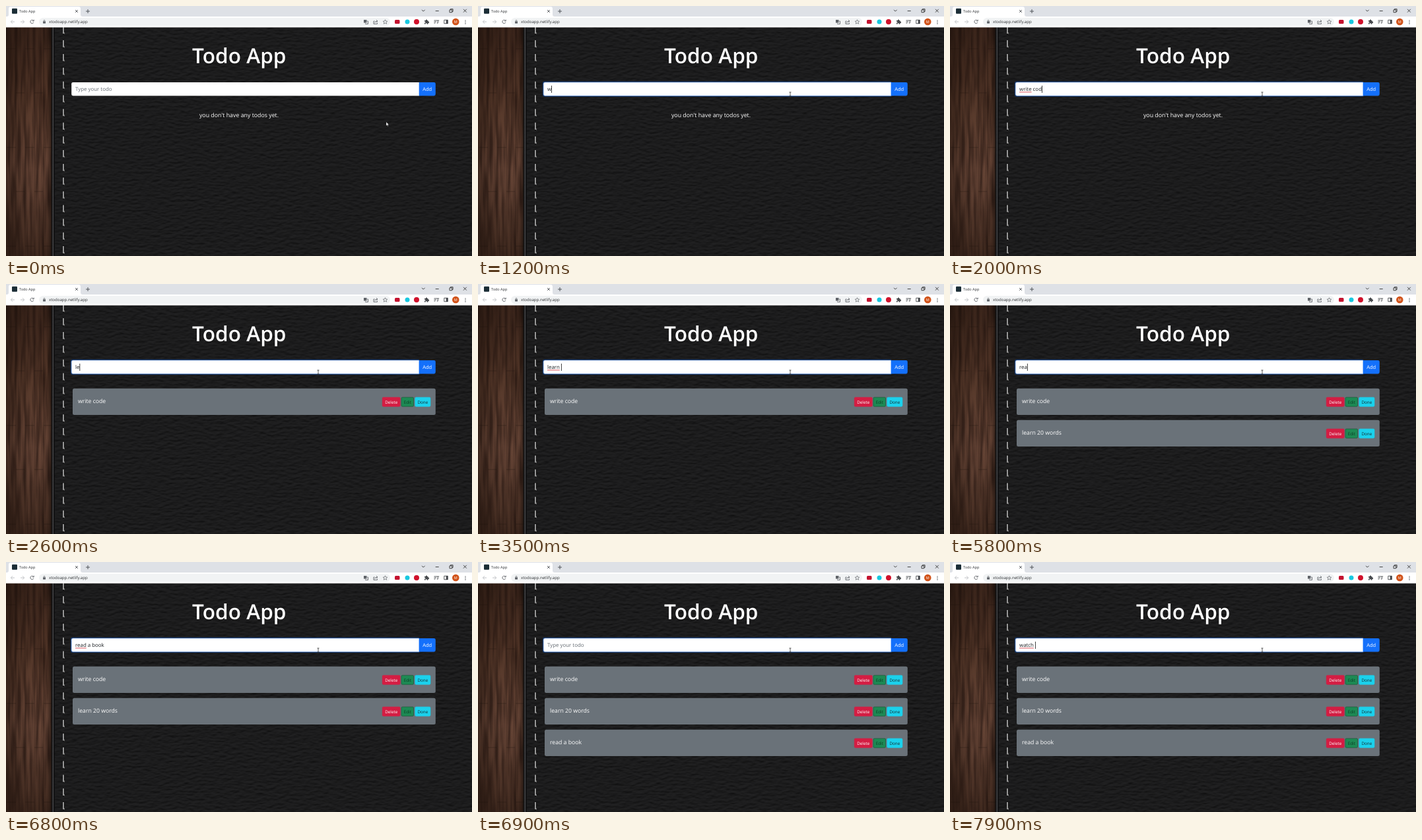
Write an HTML page that moves like this. It is 706 by 380 pixels and loops after 8 s.

```html
<!DOCTYPE html>
<html lang="en">
<head>
<meta charset="utf-8">
<title>Todo App</title>
<style>
  html, body { margin: 0; width: 100%; height: 100%; overflow: hidden; background: #1a1a1b; }
  svg { position: absolute; left: 0; top: 0; }
  #backdrop { will-change: transform; }
  text { font-family: 'Open Sans', 'Noto Sans', sans-serif; white-space: pre; text-rendering: geometricPrecision; }
  .mid { text-anchor: middle; }
  .icon { fill: none; stroke: #5f6368; stroke-width: .9; }
</style>
</head>
<body>
<svg id="backdrop" width="706" height="380">
  <defs>
    <filter id="leather" x="0" y="0" width="1" height="1" color-interpolation-filters="sRGB">
      <feTurbulence type="fractalNoise" baseFrequency=".1 .26" numOctaves="2" seed="8"/>
      <feDiffuseLighting surfaceScale="1.1" diffuseConstant="1" lighting-color="#222223">
        <feDistantLight azimuth="260" elevation="55"/>
      </feDiffuseLighting>
    </filter>
    <filter id="grain" x="0" y="0" width="1" height="1" color-interpolation-filters="sRGB">
      <feTurbulence type="fractalNoise" baseFrequency=".22 .016" numOctaves="2" seed="4"/>
      <feColorMatrix values="0 0 0 0 .08  0 0 0 0 .04  0 0 0 0 .03  1.1 0 0 0 -.35"/>
    </filter>
    <linearGradient id="wood" x2="0" y2="1">
      <stop offset="0" stop-color="#3b251b"/>
      <stop offset=".3" stop-color="#533628"/>
      <stop offset=".62" stop-color="#684637"/>
      <stop offset="1" stop-color="#422b20"/>
    </linearGradient>
    <linearGradient id="shade">
      <stop offset="0" stop-color="#150b06" stop-opacity=".4"/>
      <stop offset=".5" stop-color="#150b06" stop-opacity="0"/>
      <stop offset=".88" stop-color="#150b06" stop-opacity=".05"/>
      <stop offset="1" stop-color="#0c0806" stop-opacity=".6"/>
    </linearGradient>
    <pattern id="planks" width="28" height="150" patternUnits="userSpaceOnUse">
      <path d="M1 0V150M15 0V150M1 65H15M15 132H29" stroke="#1d100a" stroke-opacity=".45" stroke-width=".8"/>
    </pattern>
  </defs>
  <rect x="70" y="32" width="636" height="348" filter="url(#leather)"/>
  <g id="board">
    <rect y="32" width="70" height="348" fill="url(#wood)"/>
    <rect y="32" width="70" height="348" filter="url(#grain)"/>
    <rect y="32" width="70" height="348" fill="url(#planks)"/>
    <rect y="32" width="70" height="348" fill="url(#shade)"/>
  </g>
  <path d="M69.5 32V380M73 32V380" stroke="#111112" stroke-width="1.6"/>
  <path d="M71.3 32V380" stroke="#454547" stroke-width="1.5"/>
  <path d="M87.600 31.200V380" stroke="#0c0c0c" stroke-width="2.800" stroke-dasharray="12.200 8.670"/>
  <path d="M88.300 40V380" stroke="#777" stroke-width="1" stroke-dasharray="2.800 18.070"/>
  <path d="M87 31.200V380" stroke="#b0b0b0" stroke-width="1.700" stroke-dasharray="10.800 10.070"/>

  <!-- browser window -->
  <rect width="706" height="32.500" fill="#fff"/>
  <rect width="706" height="16" fill="#dee1e6"/>
  <path d="M1 16q3 0 3-3V4q0-3 3-3H110q3 0 3 3v9q0 3 3 3z" fill="#fff"/>
  <rect x="9" y="3.700" width="8" height="8" rx="1" fill="#1b2d36"/>
  <text x="20" y="10" font-size="5.500" fill="#303336">Todo App</text>
  <path class="icon" d="M105 6l3.800 3.800M108.800 6L105 9.800M121 8h6M124 5v6" style="stroke:#45484c"/>
  <path class="icon" d="M630 5.800l2.300 2.300 2.300-2.300M650.700 7.500h5M672 5.900h3.800v3.800h-3.800zM673.300 5.900V4.600h3.800v3.800h-1.300M693 4.800l4.800 4.800M697.800 4.800L693 9.600" style="stroke:#333"/>
  <path class="icon" d="M13 24H7.500M10 21.300L7.300 24l2.700 2.700M22 24h5.500M25 21.300l2.700 2.700-2.700 2.700" style="stroke:#bcbec1"/>
  <path class="icon" d="M41.700 22.500a2.600 2.600 0 1 0 .2 2.400M42.200 20.700v2.200H40"/>
  <rect x="50" y="18" width="532" height="12" rx="6" fill="#f1f3f4"/>
  <rect x="56" y="23.200" width="4" height="3.400" rx=".5" fill="#5f6368"/>
  <path class="icon" d="M57 23.400v-1a1 1 0 0 1 2 0v1" style="stroke-width:.7"/>
  <text x="65" y="26.300" font-size="6.100" fill="#2b2e31">xtodoapp.netlify.app</text>
  <rect x="542" y="21" width="4.500" height="4.500" fill="#5f6368"/>
  <path class="icon" d="M544.500 26.500v.8h4v-4.300h-1.200M558.500 23H557v4.200h5.500V25.500M558.700 25.500q.3-2.500 4-2.500M561.200 21.200l1.800 1.800-1.800 1.800"/>
  <path class="icon" d="M574.500 20.800l1 2.200 2.300.2-1.800 1.600.6 2.300-2.100-1.200-2.100 1.200.6-2.300-1.800-1.600 2.300-.2z" style="stroke-width:.7"/>
  <rect x="589" y="21" width="7.500" height="6" rx="1.500" fill="#c4122f"/>
  <circle cx="608" cy="24" r="3.500" fill="#18c8e0"/>
  <circle cx="622" cy="24" r="4" fill="#d0112b"/>
  <path d="M634 22h2a1.100 1.100 0 1 1 2 0h1.500v1.700a1.100 1.100 0 1 1 0 2v1.700h-2a1 1 0 1 0-1.800 0H634v-2a1 1 0 1 0 0-1.700z" fill="#45484c"/>
  <path class="icon" d="M648.500 22h5.500M648.500 24h3.500M648.500 26h2M654.300 21.800v4.200h-1.500M654.300 22h1.900" style="stroke:#45484c"/>
  <path class="icon" d="M663.800 21.300h5.400v5.400h-5.400z" style="stroke:#45484c"/>
  <rect x="666.700" y="21" width="2.800" height="6" fill="#45484c"/>
  <circle cx="681.300" cy="24" r="5.300" fill="#d1531a"/>
  <text class="mid" x="681.300" y="26" font-size="5.500" fill="#fff">M</text>
  <path d="M696 21.500v6" stroke="#5f6368" stroke-width="1.300" stroke-dasharray="1.300 1"/>
</svg>

<svg id="page" width="706" height="380">
  <text class="mid" x="353.300" y="87.300" font-size="31.600" font-weight="600" fill="#fff">Todo App</text>
  <rect id="ring" x="97.800" y="114.500" width="529" height="23.400" rx="3" fill="#14305c"/>
  <path id="field" d="M626 116V136.400H101.500a2.300 2.300 0 0 1-2.300-2.300V118.300a2.300 2.300 0 0 1 2.300-2.300z" fill="#fff" stroke-width=".5"/>
  <path d="M625.700 116H648.500a2.300 2.300 0 0 1 2.300 2.300V134.100a2.300 2.300 0 0 1-2.300 2.300H625.700z" fill="#1470fb"/>
  <text class="mid" x="638.200" y="129.200" font-size="7.500" fill="#fff">Add</text>
  <text id="hint" x="105" y="129.400" font-size="7.900" fill="#656c73">Type your todo</text>
  <text id="typed" x="105" y="129.400" font-size="7.900" fill="#1c2024"></text>
  <path id="spell" stroke="#d6303c" stroke-width=".8"/>
  <rect id="caret" y="121" width=".8" height="11" fill="#111"/>
  <text id="empty" class="mid" x="353" y="169.300" font-size="8.800" fill="#fff">you don't have any todos yet.</text>
  <g id="cards"></g>
  <path id="arrow" d="M0 0V5.800L1.400 4.600 2.300 6.500 3.200 6.100 2.300 4.300H4.100z" fill="#fff" stroke="#222" stroke-width=".4"/>
  <path id="beam" d="M-1.500-3H1.500M0-3V3M-1.500 3H1.500" stroke="#333" stroke-width=".8"/>
</svg>

<script>
const LOOP = 8000, FOCUS = 1000, BLINK = 300, LEFT = 105;
const $ = id => document.getElementById(id);
const show = (id, on) => $(id).style.display = on ? '' : 'none';

// Each entry: text, time of every key, time of Enter
const entries = [
  ['write code', [1200, 1300, 1400, 1500, 1600, 1700, 1800, 1900, 2000, 2100], 2300],
  ['learn 20 words', [2500, 2600, 2800, 3000, 3200, 3500, 3700, 3900, 4000, 4100, 4200, 4300, 4400, 4600], 4700],
  ['read a book', [5500, 5600, 5800, 5900, 6000, 6050, 6100, 6200, 6300, 6400, 6500], 6900],
  ['watch ', [7400, 7500, 7600, 7700, 7800, 7900], Infinity]
];
const keys = [FOCUS, ...entries.flatMap(e => e[1])];

const button = (x, w, fill, ink, label, border = fill) =>
  `<rect x="${x}" y="172.200" width="${w}" height="14" rx="1.600" fill="${fill}" stroke="${border}" stroke-width=".6"/>
   <text class="mid" x="${x + w / 2}" y="181.600" font-size="6.300" fill="${ink}">${label}</text>`;

$('cards').innerHTML = entries.slice(0, 3).map(([text], i) =>
  `<g id="card${i}" transform="translate(0 ${i * 48})">
    <rect x="101" y="158.700" width="549.800" height="40.400" rx="2.500" fill="#6a7279"/>
    <text x="109" y="181" font-size="8.680" fill="#fff">${text}</text>
    ${button(570.2, 27, '#d41d43', '#fff', 'Delete')}
    ${button(599, 18.6, '#1d8a54', '#0c3a24', 'Edit', '#14512f')}
    ${button(619.7, 23.3, '#1bd1ec', '#16282c', 'Done')}
  </g>`).join('');

function drawPointer(t) {
  const p = Math.min(1, Math.max(0, (t - 50) / 850));
  const k = p * p * (3 - 2 * p);
  const x = 576 - 103 * k, y = 176.3 - 42.3 * k;
  const inField = y < 136.5;
  show('arrow', !inField);
  show('beam', inField);
  $(inField ? 'beam' : 'arrow').setAttribute('transform', `translate(${x} ${y})`);
}

function drawField(t) {
  const focused = t >= FOCUS;
  const [text, times] = entries.find(e => t < e[2]);
  const value = text.slice(0, times.filter(k => t >= k).length);
  const typed = $('typed');
  if (typed.textContent !== value) typed.textContent = value;
  show('hint', !value);
  show('ring', focused);
  $('field').setAttribute('stroke', focused ? '#86b7fe' : 'none');

  const lastKey = keys.filter(k => t >= k).pop();
  show('caret', focused && Math.floor((t - lastKey) / BLINK) % 2 === 0);
  $('caret').setAttribute('x', LEFT + (value ? typed.getComputedTextLength() : 0));

  // The first word is marked once a space follows it
  const word = value.indexOf(' ');
  show('spell', word > 0);
  if (word > 0) $('spell').setAttribute('d', `M${LEFT} 130.900h${typed.getSubStringLength(0, word)}`);
}

function frame(now) {
  const t = now % LOOP;
  drawPointer(t);
  drawField(t);
  entries.slice(0, 3).forEach((e, i) => show('card' + i, t >= e[2]));
  show('empty', t < entries[0][2]);
}

const start = performance.now();
(function tick() {
  frame(performance.now() - start);
  requestAnimationFrame(tick);
})();
</script>
</body>
</html>
```
